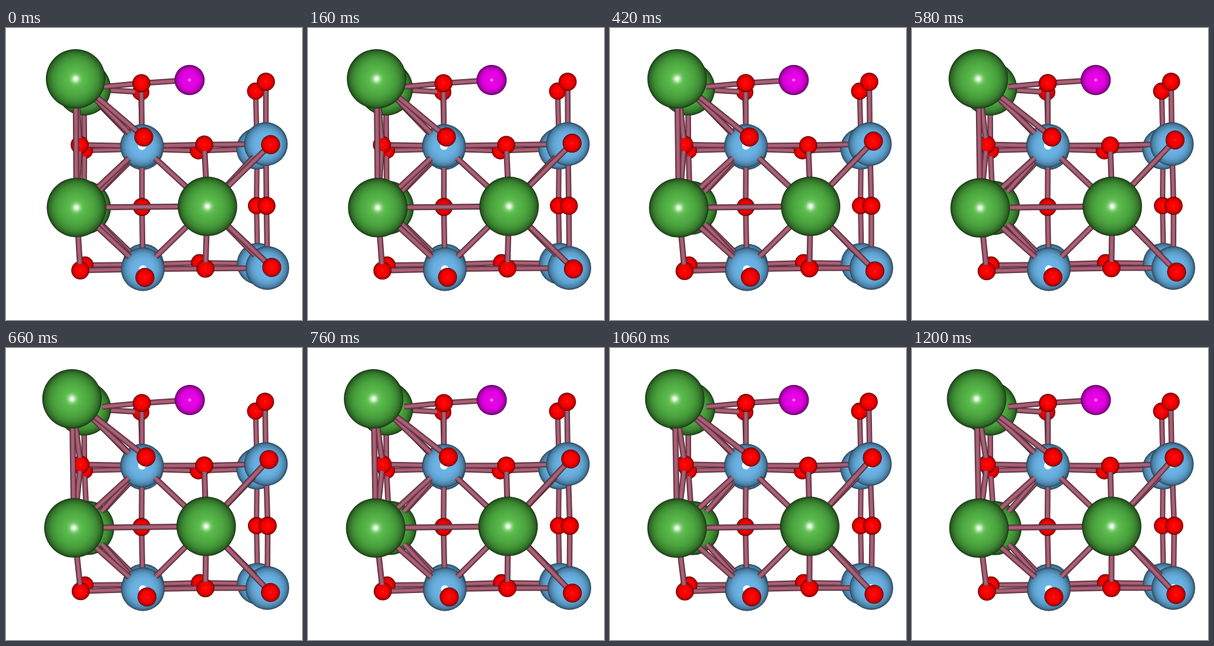
An HTML page with a canvas for the animation above (1.22 s loop, 504 by 497 pixels).

```html
<!DOCTYPE html>
<html lang="en">
<head>
<meta charset="utf-8">
<title>Crystal relaxation</title>
<style>
html, body { margin: 0; width: 100%; height: 100%; overflow: hidden; background: #fff; }
canvas { display: block; }
</style>
</head>
<body>
<canvas id="stage" width="504" height="497"></canvas>
<script>
const ctx = document.getElementById('stage').getContext('2d');
const LOOP = 1220, STEP = 20, END = 1200;
const DEPTH = 105; // distance between neighbouring layers

// Radius and shading from centre to rim
const kinds = {
  G: [48.2, shade('0 #fff, .05 #e6f8e1, .1 #b4e3aa, .16 #7ccb6f, .24 #5cbc4d, .4 #53b146, .6 #4aa33e, .78 #3d8a33, .9 #2f6c27, .97 #214d1b, 1 #142d10')],
  B: [37.2, shade('0 #fff, .16 #fff, .19 #6db5e6, .5 #68afe0, .7 #5d9fcc, .87 #4a80a5, .96 #365e7a, 1 #203848')],
  R: [15.4, shade('0 #ff1c1c, .2 #ff0303, .5 #f80000, .72 #e00000, .88 #b40000, .96 #830000, 1 #500000')],
  M: [25.7, shade('0 #fff, .04 #fff, .08 #f020f0, .2 #ea00ea, .55 #e000e0, .78 #c000c0, .92 #900090, 1 #500050')]
};

// Layers from far to near. The first letter of a name is its kind;
// values are x, y, dx, dy.
const layers = [
  {
    scale: .95, width: 9,
    atoms: {
      B1b: [232, 205.5], B2b: [427, 205], B3b: [233, 402], B4b: [428, 400.5],
      R2: [229, 108.5], R4: [424.5, 107], R7: [133, 208], R9: [327, 208.5],
      R13: [426, 302], R15: [134, 403], R18: [329, 399]
    },
    bonds: pairs('R2-B1b R7-B1b B1b-R9 R9-B2b R4-B2b B2b-R13 R13-B4b R15-B3b B3b-R18 R18-B4b')
  },
  {
    scale: .955, width: 9.5,
    atoms: { G1b: [132, 102.5, .5, 0], G2b: [132, 305, 8, 1] },
    bonds: pairs('G1b-R2 G1b-R7 G2b-R7 G1b-B1b G2b-B1b G2b-B3b')
  },
  {
    scale: 1, width: 9.5,
    atoms: {
      B1: [231, 200.5, 0, -1], B2: [442, 197], B3: [232.5, 410], B4: [444.5, 408],
      R1: [230, 93.5, 1, -.5], M1: [312, 88, .5, 0], R3: [442, 91, -2, 0],
      R6: [125, 198.5, 2, -1], R8: [337, 198, 0, 2], R11: [231, 304, -1, 0],
      R12: [443, 302, 3, 0], R14: [126, 412, 1, 2], R17: [339, 409, 0, -1]
    },
    bonds: pairs('G1b-R1 R1-M1 R1-B1 R6-B1 B1-R8 R8-B2 R3-B2 B2-R12 R12-B4 B1-R11 R11-B3 ' +
      'R14-B3 B3-R17 R17-B4 G1b-B1 G2b-B1 G2b-B3')
  },
  {
    scale: 1.05, width: 10,
    atoms: {
      G1: [118, 86, -8.5, 0], G2: [119.5, 305, -6, 1], G3: [342.5, 303, -3, 0],
      R5: [234, 185, 5.5, 0], R10: [450, 198, -4, -12],
      R16: [236, 424, 5, -1], R19: [452, 407, -3, 12]
    },
    bonds: pairs('G1-R6 G2-R6 G2-R14 G1-B1 G2-B1 G2-B3 G3-B1 G3-B2 G3-B3 G3-B4 ' +
      'G3-R8 G3-R17 G1-G2 G1-R5 G2-G3 G3-R10 G3-R19')
  }
];

const tube = [[1, '#4b2832'], [.8, '#7c4455'], [.56, '#9b566b'], [.28, '#ae6279']];

function shade(stops) {
  const g = ctx.createRadialGradient(0, 0, 0, 0, 0, 1);
  for (const s of stops.split(', ')) {
    const [at, color] = s.split(' ');
    g.addColorStop(+at, color);
  }
  return g;
}

function pairs(text) {
  return text.split(' ').map(s => s.split('-'));
}

// Where a bond rising from atom a towards b leaves the surface of a
function exit(a, b) {
  if (a.layer >= b.layer) return a;
  const dx = b.x - a.x, dy = b.y - a.y;
  const k = a.r / Math.hypot(dx, dy, DEPTH);
  return { x: a.x + dx * k, y: a.y + dy * k };
}

function bond(a, b, width) {
  const from = exit(a, b), to = exit(b, a);
  for (const [part, color] of tube) {
    ctx.beginPath();
    ctx.moveTo(from.x, from.y);
    ctx.lineTo(to.x, to.y);
    ctx.lineWidth = width * part;
    ctx.strokeStyle = color;
    ctx.stroke();
  }
}

function ball({ x, y, r, fill }) {
  ctx.save();
  ctx.translate(x, y);
  ctx.scale(r, r);
  ctx.beginPath();
  ctx.arc(0, 0, 1, 0, 2 * Math.PI);
  ctx.fillStyle = fill;
  ctx.fill();
  ctx.restore();
}

function place(p) {
  const placed = {};
  layers.forEach(({ atoms, scale }, layer) => {
    for (const [name, [x, y, dx = 0, dy = 0]] of Object.entries(atoms)) {
      const [radius, fill] = kinds[name[0]];
      placed[name] = { x: x + dx * p, y: y + dy * p, r: radius * scale, fill, layer };
    }
  });
  return placed;
}

function draw(t) {
  const placed = place(1 - Math.pow(1 - t / END, 1.6));
  ctx.setTransform(1, 0, 0, 1, 0, 0);
  ctx.fillStyle = '#fff';
  ctx.fillRect(0, 0, 504, 497);
  ctx.translate(.5, .5);
  for (const { atoms, width, bonds } of layers) {
    for (const [a, b] of bonds) bond(placed[a], placed[b], width);
    for (const name in atoms) ball(placed[name]);
  }
}

const start = performance.now();
function tick() {
  const t = (performance.now() - start) % LOOP;
  draw(Math.floor(t / STEP) * STEP);
  requestAnimationFrame(tick);
}
tick();
</script>
</body>
</html>
```
